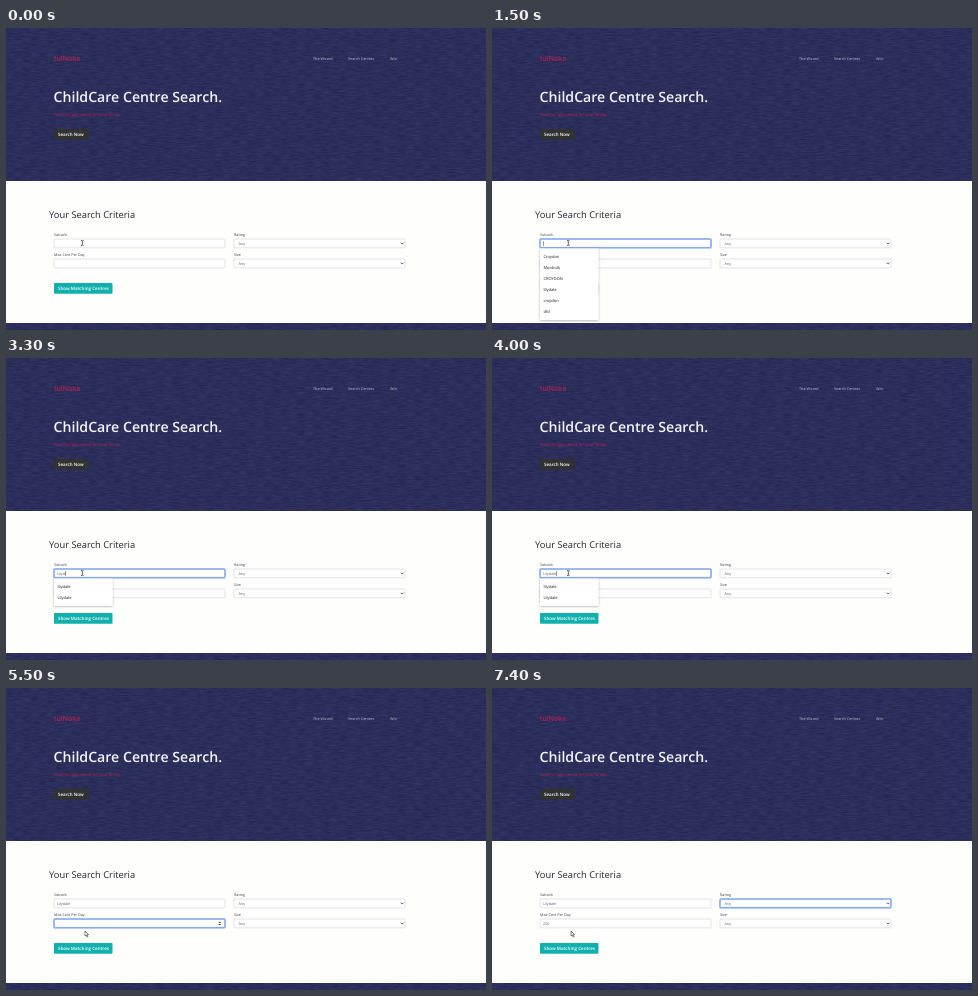
Write an HTML page that moves like this. It is 480 by 302 pixels and loops after 8000 ms.

```html
<!DOCTYPE html>
<html lang="en">
<head>
<meta charset="utf-8">
<title>ChildCare Centre Search</title>
<style>
  html, body { margin: 0; height: 100%; overflow: hidden; background: #fefefc; }
  svg { display: block; width: 100vw; height: 100vh; }
  text { font: 3.75px "Open Sans", "Noto Sans", sans-serif; fill: #3c4150; text-rendering: geometricPrecision; white-space: pre; }
  .logo { font: 7.3px Inter, sans-serif; fill: #c41f50; }
  .nav { fill: #bfc0d0; }
  .title { font-size: 14.15px; font-weight: 600; fill: #f4f5fa; }
  .tagline { font-size: 4px; fill: #c41f50; }
  .heading { font-size: 9.36px; fill: #25282f; }
  .button { font-size: 4.5px; font-weight: 600; fill: #fff; }
  .value { fill: #5a5f69; }
  .option { font-size: 4px; font-weight: 500; fill: #1c1c1c; }
  .field { fill: #fff; stroke: #cdd1d7; stroke-width: .6; }
  .ring { fill: none; stroke: #5b8def; stroke-width: .8; }
  .glow { fill: none; stroke: #a9c5fa; stroke-width: 2; opacity: .6; }
</style>
</head>
<body>
<svg id="stage" viewBox="0 0 480 302" preserveAspectRatio="none">
  <defs>
    <filter id="denim" x="0" y="0" width="1" height="1" color-interpolation-filters="sRGB">
      <feTurbulence type="fractalNoise" baseFrequency=".12 .7" numOctaves="2" seed="4"/>
      <feColorMatrix values=".09 0 0 0 .127  .09 0 0 0 .138  .11 0 0 0 .304  0 0 0 0 1"/>
    </filter>
    <filter id="shadow" x="-.2" y="-.2" width="1.4" height="1.4">
      <feDropShadow dx="0" dy=".6" stdDeviation="1" flood-opacity=".35"/>
    </filter>
  </defs>
  <rect width="480" height="302" fill="#fefefc"/>
  <rect width="480" height="152.4" filter="url(#denim)"/>
  <rect y="295" width="480" height="7" filter="url(#denim)"/>
  <g id="page"></g>
  <g id="menu" filter="url(#shadow)">
    <rect id="menuBox" x="48" y="220.5" width="58.6" rx=".5" fill="#fff"/>
    <g id="options"></g>
  </g>
  <path id="beam" d="M-1.2-2.6Q0-2.6 0-1.8Q0-2.6 1.2-2.6M0-1.8V1.8M-1.2 2.6Q0 2.6 0 1.8Q0 2.6 1.2 2.6" fill="none" stroke="#222" stroke-width=".7"/>
  <path id="arrow" d="M0 0V5L1.2 4L2.1 6L3 5.6L2.1 3.7H3.6Z" fill="#fff" stroke="#222" stroke-width=".55"/>
</svg>
<script>
const LOOP = 8000;
const $ = id => document.getElementById(id);
const label = (x, y, text, kind = "") => `<text x="${x}" y="${y}" class="${kind}">${text}</text>`;
const box = (x, y, w, h, fill) => `<rect x="${x}" y="${y}" width="${w}" height="${h}" rx=".8" fill="${fill}"/>`;
const outline = (x, y, kind) => `<rect x="${x}" y="${y}" width="171" height="8.8" rx=".9" class="${kind}"/>`;

const field = (id, x, y, caption, content) =>
  label(x, y - 3.4, caption) + outline(x, y, "field") +
  `<g id="${id}Ring" opacity="0">${outline(x, y, "glow")}${outline(x, y, "ring")}</g>` + content;

const input = (id, y, caption) => field(id, 48, y, caption,
  `<text id="${id}Text" x="51" y="${y + 5.6}" class="value"></text>
   <rect id="${id}Caret" y="${y + 2.1}" width=".5" height="4.8" fill="#333"/>`);

const select = (id, y, caption) => field(id, 228, y, caption,
  label(232.5, y + 5.6, "Any", "value") +
  `<path d="M394.9 ${y + 3.7}l1.3 1.4l1.3-1.4" fill="none" stroke="#333" stroke-width=".8"/>`);

$("page").innerHTML = [
  label(48, 33, "tulNoke", "logo"),
  label(307, 31.7, "The Wizard", "nav"),
  label(342, 31.7, "Search Centres", "nav"),
  label(384, 31.7, "Wiki", "nav"),
  label(47.5, 74, "ChildCare Centre Search.", "title"),
  label(48, 88, "Find the right centre for your family.", "tagline"),
  box(48, 101, 34.5, 10.6, "#30332f"),
  label(52, 107.9, "Search Now", "button"),
  label(43, 190.4, "Your Search Criteria", "heading"),
  input("suburb", 211, "Suburb"),
  input("cost", 231, "Max Cost Per Day"),
  `<path id="spinner" d="M212.4 235l1.3-1.6l1.3 1.6zM212.4 236l1.3 1.6l1.3-1.6z" fill="#333"/>`,
  select("rating", 211, "Rating"),
  select("size", 231, "Size"),
  box(48, 255, 58.5, 10.8, "#10b0af"),
  label(52, 262, "Show Matching Centres", "button"),
].join("");

const allSuburbs = ["Croydon", "Monbulk", "CROYDON", "lilydale", "croydon", "dfd"];
const matches = ["lilydale", "Lilydale"];
const suburbKeys = [1900, 2200, 2600, 3000, 3300, 3500, 3700, 4000];
const costKeys = [6100, 6500, 6700];

const between = (t, from, to) => t >= from && t < to;
const ramp = (t, from, to) => Math.min(1, Math.max(0, (t - from) / (to - from)));
const show = (id, visible) => $(id).setAttribute("visibility", visible ? "visible" : "hidden");

function setRing(id, t, on, off) {
  $(id + "Ring").setAttribute("opacity", ramp(t, ...on) - ramp(t, ...off));
}

// The caret blinks every half second, restarting at each key press.
function typeInto(id, text, keys, t, focusAt, blurAt) {
  const pressed = keys.filter(k => t >= k);
  const restart = pressed.length ? pressed[pressed.length - 1] : focusAt;
  const value = $(id + "Text");
  value.textContent = text.slice(0, pressed.length);
  const width = pressed.length ? value.getComputedTextLength() : 0;
  $(id + "Caret").setAttribute("x", 51.1 + width);
  show(id + "Caret", between(t, focusAt, blurAt) && Math.floor((t - restart) / 500) % 2 === 0);
}

let listed;
function setMenu(t) {
  show("menu", between(t, 500, 4900));
  const items = t < 1900 ? allSuburbs : matches;
  if (items === listed) return;
  listed = items;
  $("menuBox").setAttribute("height", items.length * 11.1 + 5);
  $("options").innerHTML = items.map((name, i) => label(51.5, 229.9 + i * 11.1, name, "option")).join("");
}

function setPointer(t) {
  const path = [[76.3, 215], [76.5, 222], [77, 236], [78, 248], [79, 243]];
  const step = Math.min(4, Math.max(0, Math.floor((t - 5100) / 100)));
  const isArrow = step > 2;
  show("beam", !isArrow);
  show("arrow", isArrow);
  $(isArrow ? "arrow" : "beam").setAttribute("transform", `translate(${path[step]})`);
}

function draw(now) {
  const t = Math.floor(now % LOOP / 100) * 100;
  setRing("suburb", t, [300, 600], [4800, 5000]);
  setRing("cost", t, [4900, 5000], [7200, 7400]);
  setRing("rating", t, [7200, 7400], [LOOP, LOOP + 1]);
  typeInto("suburb", "Lilydale", suburbKeys, t, 500, 4900);
  typeInto("cost", "200", costKeys, t, 4900, 7300);
  show("spinner", between(t, 4900, 7300));
  setMenu(t);
  setPointer(t);
}

const start = performance.now();
function tick() {
  draw(performance.now() - start);
  requestAnimationFrame(tick);
}
tick();
</script>
</body>
</html>
```
